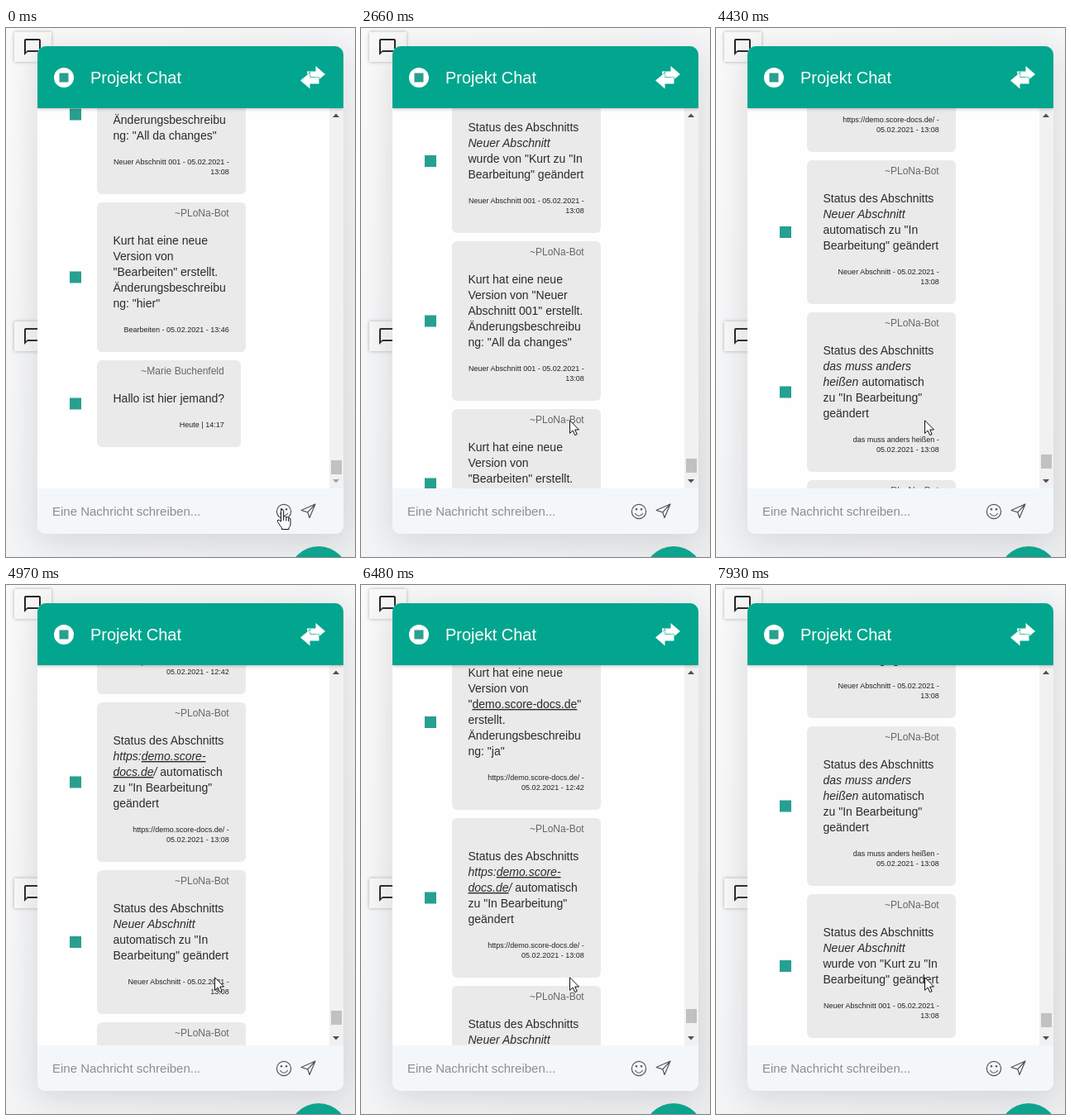
Recreate the animation shown at these times as an HTML page. Size 422 by 640 pixels, loop 8000 ms.

```html
<!DOCTYPE html>
<html lang="de">
<head>
<meta charset="utf-8">
<title>Projekt Chat</title>
<style>
  html, body { margin: 0; width: 100%; height: 100%; overflow: hidden; }
  body { background: #f5f6f7; font-family: "Liberation Sans", Arial, sans-serif; }
  #stage { position: relative; width: 422px; height: 640px; overflow: hidden;
    background: linear-gradient(135deg, #fafafa 10%, #f5f6f8 50%, #eceef0); }
  #stage div, svg { position: absolute; }
  .note { left: 10px; width: 45px; height: 36px; background: #f9f9f9; box-shadow: 0 0 4px rgba(0,0,0,.3); }
  .note svg { left: 10px; top: 6px; }
  .fab { left: 342px; top: 627px; width: 72px; height: 72px; border-radius: 50%; background: #02a68e; }
  .window { left: 38px; top: 22px; width: 370px; height: 590px; border-radius: 10px; background: #fefefe;
    box-shadow: 0 7px 40px 2px rgba(148,149,150,.32); overflow: hidden; }
  .header { left: 0; top: 0; width: 370px; height: 75px; background: #02a68e; box-shadow: 0 1px 4px rgba(0,0,0,.25); }
  .footer { left: 0; top: 535px; width: 370px; height: 55px; background: #f4f7f9; }
  svg { left: 0; top: 0; }
  .title { font-size: 20px; fill: #fff; }
  .hint { font-size: 15px; fill: #8b8d90; }
  .name { font-size: 12px; fill: #666; text-anchor: end; }
  .body { font-size: 14px; fill: #2b2b2b; white-space: pre; }
  .meta { font-size: 9px; fill: #222; text-anchor: end; }
  .i { font-style: italic; }
  .u { text-decoration: underline; }
  .line { fill: none; stroke: #50545c; stroke-width: 1.2; stroke-linejoin: round; stroke-linecap: round; }
</style>
</head>
<body>
<div id="stage">
  <div class="note" style="top:5px"></div>
  <div class="note" style="top:355px"></div>
  <div class="fab"></div>
  <div class="window">
    <svg id="list" width="370" height="535" viewBox="38 22 370 535">
      <g id="messages"></g>
      <rect x="391" y="97" width="17" height="460" fill="#f1f1f1"/>
      <path d="M395 108l4-4.5 4 4.5z" fill="#505050"/>
      <path id="down" d="M395 546l4 4.5 4-4.5z"/>
      <rect id="thumb" x="393" width="13" height="17" fill="#c1c1c1"/>
    </svg>
    <div class="header"></div>
    <div class="footer"></div>
  </div>
  <svg width="422" height="640">
    <circle cx="70" cy="60" r="12" fill="#fff"/>
    <rect x="64.5" y="54.5" width="11" height="11" fill="#27a08f"/>
    <text class="title" x="102" y="67">Projekt Chat</text>
    <g fill="#fff">
      <path d="M364 52.5H374.5V46L386 56 374.5 65.5V59.5H364Z"/>
      <path d="M378.5 60V67.5H367.5V73.5L356 63.5 367.5 54V60Z" stroke="#02a68e" stroke-width="1.2" paint-order="stroke"/>
    </g>
    <text class="hint" x="56" y="590">Eine Nachricht schreiben...</text>
    <g class="line">
      <circle cx="336" cy="585" r="8.6"/>
      <path d="M331.6 587.5Q336 593 340.4 587.5"/>
      <path d="M357 583.5L374 576 367 592.5 364.8 585.8ZM364.8 585.8L374 576"/>
    </g>
    <g fill="#50545c"><circle cx="333" cy="582.3" r="1.2"/><circle cx="339" cy="582.3" r="1.2"/></g>
    <path id="hand" fill="#fff" stroke="#111" stroke-linejoin="round"
      d="M332.5 597V584.5Q332.5 582.5 334 582.5T335.7 584.5V591.5Q337.5 589.7 338.8 592 340.5 590.7 341.6 592.8 343.8 592 344 595V600Q344 603 342 604.5V606.5H333.5V604.5Q331 602 328.6 597.5 327.5 594.8 330 595.2ZM335.7 591.5V596M338.8 592V596.5M341.6 593V597"/>
    <path id="arrow" fill="#fff" stroke="#111" stroke-linejoin="round"
      d="M.5 .8V16.3L4.1 13 6.7 18.6 9.2 17.5 6.7 12H11.5Z"/>
  </svg>
</div>
<script>
const $ = id => document.getElementById(id);
const LOOP = 8000;
const BOT = "PLoNa-Bot", DATE = "05.02.2021 -";
const STATUS = "Status des Abschnitts", NEW = "<i>Neuer Abschnitt</i>";
const EDIT = 'Bearbeitung" geändert', LONG = "Änderungsbeschreibu";

// author, bubble width, body lines, footer lines
const chat = [
  ["Gast-Kurt", 114, ["hallo"], ["08.01.2021 - 11:45"]],
  [BOT, 180, ["Kurt hat eine neue", "Version von", '"<u>demo.score-docs.de</u>"', "erstellt.", LONG, 'ng: "ja"'],
    ["https://demo.score-docs.de/ -", "05.02.2021 - 12:42"]],
  [BOT, 180, [STATUS, "<i>https:</i><iu>demo.score-</iu>", "<iu>docs.de</iu><i>/</i> automatisch", 'zu "In Bearbeitung"', "geändert"],
    ["https://demo.score-docs.de/ -", "05.02.2021 - 13:08"]],
  [BOT, 180, [STATUS, NEW, 'automatisch zu "In', EDIT], ["Neuer Abschnitt - " + DATE, "13:08"]],
  [BOT, 180, [STATUS, "<i>das muss anders</i>", "<i>heißen</i> automatisch", 'zu "In Bearbeitung"', "geändert"],
    ["das muss anders heißen -", "05.02.2021 - 13:08"]],
  [BOT, 180, [STATUS, NEW, 'wurde von "Kurt zu "In', EDIT], ["Neuer Abschnitt 001 - " + DATE, "13:08"]],
  [BOT, 180, ["Kurt hat eine neue", 'Version von "Neuer', 'Abschnitt 001" erstellt.', LONG, 'ng: "All da changes"'],
    ["Neuer Abschnitt 001 - " + DATE, "13:08"]],
  [BOT, 180, ["Kurt hat eine neue", "Version von", '"Bearbeiten" erstellt.', LONG, 'ng: "hier"'],
    ["Bearbeiten - 05.02.2021 - 13:46"]],
  ["Marie Buchenfeld", 174, ["Hallo ist hier jemand?"], ["Heute | 14:17"]]
];

const spans = s => s.replace(/<(iu|i|u)>/g, (m, c) => `<tspan class="${[...c].join(" ")}">`)
  .replace(/<\/(iu|i|u)>/g, "</tspan>");
const text = (cls, x, y, s) => `<text class="${cls}" x="${x}" y="${y}">${spans(s)}</text>`;

let top0 = -1103;
$("messages").innerHTML = chat.map(([author, width, body, meta]) => {
  const y = top0, right = 110 + width - 20.3;
  const metaY = y + 81 + 19 * (body.length - 1);
  const height = metaY + 12 * (meta.length - 1) + 24 - y;
  top0 += height + 10;
  return `<rect x="110" y="${y}" width="${width}" height="${height}" rx="6" fill="#eaeaea"/>` +
    `<rect x="77" y="${y + height / 2 - 7}" width="14" height="14" fill="#27a08f"/>` +
    text("name", right, y + 17, "~" + author) +
    body.map((s, i) => text("body", 129.5, y + 51 + 19 * i, s)).join("") +
    meta.map((s, i) => text("meta", right, metaY + 12 * i, s)).join("");
}).join("");

for (const note of document.querySelectorAll(".note"))
  note.innerHTML = '<svg width="24" height="24"><path fill="#222" d="M20 2H4c-1.1 0-2 .9-2 2v18l4-4h14c1.1 0 2-.9 2-2V4c0-1.1-.9-2-2-2zm0 14H6l-2 2V4h16v12z"/></svg>';

// Each burst: first time, last time, then the value held at every tick between
const scrolls = [
  [1440, 1590, 13, 69, 100],
  [2120, 2280, 113, 169, 200],
  [2590, 2820, 204, 250, 296, 300],
  [2970, 3130, 313, 369, 400],
  [3430, 3740, 423, 485, 548, 590, 600],
  [3970, 4200, 604, 650, 696, 700],
  [4430, 4740, 723, 785, 848, 890, 900],
  [4970, 5370, 908, 960, 1035, 1115, 1180, 1200],
  [6070, 6220, 1187, 1131, 1100],
  [6390, 6630, 1096, 1048, 1004, 1000],
  [7030, 7550, 990, 940, 872, 800, 728, 665, 615, 600],
  [7860, 7930, 596, 550]
];
const moves = [
  [70, 280, [292, 525], [266, 463], [259, 447]],
  [520, 740, [258, 452], [256, 462], [253, 471], [252, 474]]
];
const steps = bursts => bursts.flatMap(([from, to, ...values]) => values.map((v, i) =>
  [Math.floor((from + (to - from) * i / (values.length - 1)) / 10) * 10, v]));
const scrollSteps = steps(scrolls), moveSteps = steps(moves);
const held = (list, t, start) => list.reduce((v, [at, next]) => t >= at ? next : v, start);

function draw(t) {
  const scroll = held(scrollSteps, t, 0);
  const pointer = held(moveSteps, t, null);
  $("messages").setAttribute("transform", `translate(0 ${scroll})`);
  $("thumb").setAttribute("y", Math.round(523 - scroll * 0.0092));
  $("down").setAttribute("fill", scroll ? "#505050" : "#a3a3a3");
  $("hand").style.display = pointer ? "none" : "";
  $("arrow").style.display = pointer ? "" : "none";
  if (pointer) $("arrow").setAttribute("transform", `translate(${pointer})`);
}

const begin = performance.now();
function tick() {
  draw((performance.now() - begin) % LOOP);
  requestAnimationFrame(tick);
}
draw(0);
requestAnimationFrame(tick);
</script>
</body>
</html>
```
